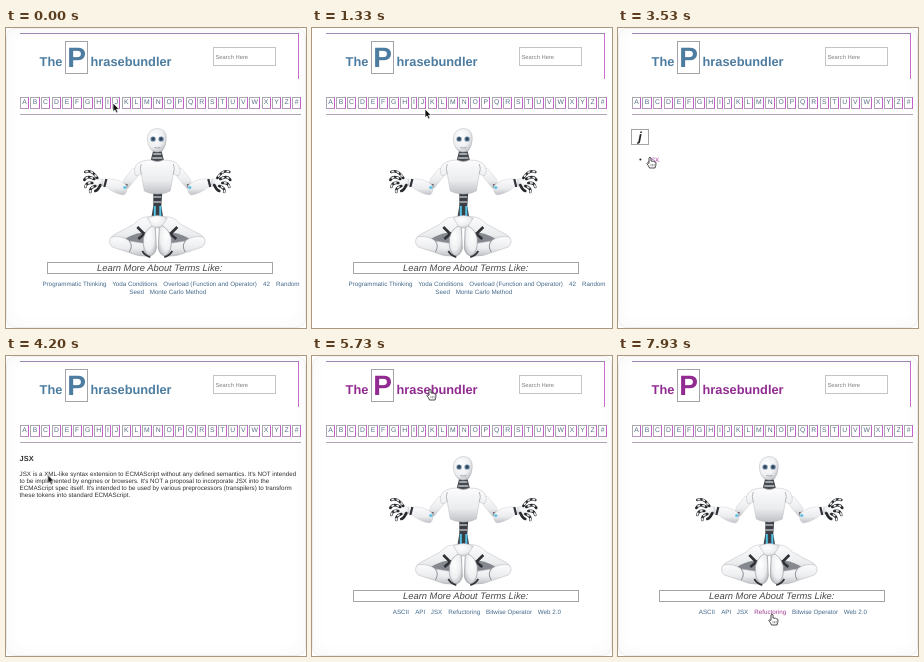
Recreate the animation shown at these times as an HTML page. Size 300 by 300 pixels, loop 8000 ms.

```html
<!DOCTYPE html>
<html lang="en">
<head>
<meta charset="utf-8">
<title>The Phrasebundler</title>
<style>
html, body { margin: 0; width: 100%; height: 100%; overflow: hidden; background: #fff; }
body { position: relative; font-family: "Liberation Sans", Arial, sans-serif; text-rendering: geometricPrecision; }
svg { position: absolute; left: 0; top: 0; width: 300px; height: 300px; }
.frame {
  position: absolute; left: 0; top: 0; width: 300px; height: 300px; box-sizing: border-box;
  border: 1px solid #ededed; border-radius: 9px; box-shadow: inset 0 0 16px rgba(0,0,0,.035);
  animation: frame 8s linear infinite;
}
nav { position: absolute; left: 14px; top: 69px; width: 281px; height: 12px; display: flex; justify-content: space-between; }
nav b {
  box-sizing: border-box; height: 12px; padding: 0 1.3px; border: 1px solid #aaa6b0;
  border-right-color: #c45fca; border-bottom-color: #b893be;
  font: 6.8px/10px "Liberation Sans", Arial, sans-serif; color: #566f84;
}
nav .hot { animation: hotCell 8s step-end infinite; }
text { font-size: 6.24px; fill: #446a8b; white-space: pre; }
.logo text { font-size: 12.8px; font-weight: bold; fill: inherit; }
.logo .cap { font-size: 28px; text-anchor: middle; }
.logo { fill: #4c7ca0; animation: logo 8s step-end infinite; }
.ink text { fill: #303030; }
.box { fill: none; stroke: #a5a3aa; }
.show { visibility: hidden; animation: 8s step-end infinite; }
.robot { animation-name: robot; }
.home1 { animation-name: home1; }
.letter { animation-name: letter; }
.term { animation-name: term; }
.home2 { animation-name: home2; }
.arrow { animation-name: arrow; }
.hand { animation-name: hand; }
text.jsx { animation: jsx 8s step-end infinite; }
text.pick { animation: pick 8s step-end infinite; }
.cursor { animation: move 8s ease-in-out infinite; }

@keyframes frame { 0% { opacity: 1 } 10% { opacity: 0 } 17.5% { opacity: 0 } 21.6%, 100% { opacity: 1 } }
@keyframes robot { 0% { visibility: visible } 30.9% { visibility: hidden } 68.75%, 100% { visibility: visible } }
@keyframes home1 { 0% { visibility: visible } 30.9%, 100% { visibility: hidden } }
@keyframes letter { 0% { visibility: hidden } 30.9% { visibility: visible } 48.4%, 100% { visibility: hidden } }
@keyframes term { 0% { visibility: hidden } 48.4% { visibility: visible } 68.75%, 100% { visibility: hidden } }
@keyframes home2 { 0% { visibility: hidden } 68.75%, 100% { visibility: visible } }
@keyframes arrow {
  0% { visibility: visible } 23% { visibility: hidden } 33.3% { visibility: visible }
  40% { visibility: hidden } 49% { visibility: visible } 65% { visibility: hidden }
  80.5% { visibility: visible } 95%, 100% { visibility: hidden }
}
@keyframes hand {
  0% { visibility: hidden } 23% { visibility: visible } 33.3% { visibility: hidden }
  40% { visibility: visible } 49% { visibility: hidden } 65% { visibility: visible }
  80.5% { visibility: hidden } 95%, 100% { visibility: visible }
}
@keyframes logo { 0% { fill: #4c7ca0 } 65%, 100% { fill: #922b91 } }
@keyframes hotCell { 0% { color: #566f84 } 23% { color: #a03aa0 } 33.3%, 100% { color: #566f84 } }
@keyframes jsx { 0% { fill: #446a8b } 40%, 100% { fill: #a03aa0 } }
@keyframes pick { 0% { fill: #446a8b } 95%, 100% { fill: #a03a90 } }
@keyframes move {
  0% { transform: translate(107px, 75px) }
  12%, 17% { transform: translate(113px, 81px) }
  24%, 32.6% { transform: translate(110px, 77px) }
  34.2%, 36% { transform: translate(37px, 123px) }
  40.5%, 50% { transform: translate(32px, 129px) }
  60.5%, 62.5% { transform: translate(114px, 42px) }
  66%, 79% { transform: translate(118px, 33px) }
  92.5%, 95% { transform: translate(153px, 249px) }
  98.5%, 100% { transform: translate(154px, 258px) }
}
</style>
</head>
<body>
<svg viewBox="0 0 300 300">
  <defs>
    <linearGradient id="shell" x1="0" y1="0" x2="0" y2="1">
      <stop offset="0" stop-color="#fcfcfd"/><stop offset=".6" stop-color="#ebecee"/><stop offset="1" stop-color="#bfc1c5"/>
    </linearGradient>
    <radialGradient id="ball" cx=".4" cy=".35" r=".75">
      <stop offset="0" stop-color="#fff"/><stop offset=".6" stop-color="#eeeff1"/><stop offset="1" stop-color="#b2b4b9"/>
    </radialGradient>
    <g id="side">
      <!-- arm -->
      <path d="M-24 140Q-16 143 -20 149L-29 160Q-33 163 -35 159L-33 151Z" fill="url(#shell)" stroke="#c2c4c8" stroke-width=".4"/>
      <path d="M-31 156L-33 164" stroke="#55585f" stroke-width="3"/>
      <path d="M-31 157Q-40 150 -50 151L-52 158Q-43 166 -34 167Q-29 165 -31 157Z" fill="url(#shell)" stroke="#c2c4c8" stroke-width=".4"/>
      <circle cx="-32.5" cy="159.5" r="1.6" fill="#5fc3e2"/>
      <path d="M-51 151L-53 159" stroke="#303237" stroke-width="2.2"/>
      <path d="M-54 151Q-62 148 -67 151Q-67 156 -61 159Q-56 160 -54 157Z" fill="url(#ball)"/>
      <g fill="none" stroke-linecap="round">
        <path d="M-60 150Q-66 141 -72 144M-63 151Q-70 147 -73 152M-65 155Q-71 154 -72 159M-62 158Q-68 160 -67 164M-57 157Q-59 162 -62 163" stroke="#26282c" stroke-width="2.6"/>
        <path d="M-60 150Q-66 141 -72 144M-63 151Q-70 147 -73 152M-65 155Q-71 154 -72 159M-62 158Q-68 160 -67 164" stroke="#eceef0" stroke-width="1.6" stroke-dasharray="1.6 3.6" stroke-dashoffset="-2"/>
      </g>
      <!-- leg -->
      <path d="M-4 189Q-16 187 -23 196L-44 207Q-50 212 -44 217L-16 219L-2 207Z" fill="url(#shell)" stroke="#bbbdc2" stroke-width=".5"/>
      <path d="M-12 204Q-26 206 -34 212L-16 216L-4 210Z" fill="#85888e"/>
      <path d="M-46 209Q-36 207 -28 213L-9 216Q-2 222 -9 228Q-20 229 -30 224L-45 219Q-50 214 -46 209Z" fill="url(#shell)" stroke="#b2b4b9" stroke-width=".5"/>
      <path d="M-20 199L-13 206L-19 211" fill="none" stroke="#2f3136" stroke-width="2.6"/>
      <path d="M-28 213Q-24 218 -28 224" fill="none" stroke="#8b8e94" stroke-width="1"/>
      <path d="M-2 197Q-11 199 -14 210Q-15 224 -8 228Q-2 227 -1 220Z" fill="url(#ball)" stroke="#8d9096" stroke-width=".6"/>
      <path d="M-15 223Q-12 228 -7 229" fill="none" stroke="#303237" stroke-width="1.8"/>
    </g>
  </defs>

  <path d="M14 5.5H293" stroke="#9d88b4"/>
  <path d="M292.5 6V51" stroke="#c86fca"/>
  <path d="M14 86.5H295" stroke="#b3a3b8"/>
  <rect class="box" x="59.5" y="13.5" width="22" height="32"/>
  <g class="logo">
    <text x="33.6" y="38">The</text>
    <text class="cap" x="70.5" y="39">P</text>
    <text x="84.5" y="38">hrasebundler</text>
  </g>
  <rect class="box" x="207.5" y="19.5" width="62" height="18" stroke-opacity=".65"/>
  <text x="209.5" y="30.6" style="font-size:5.8px;fill:#808080">Search Here</text>

  <g class="show robot">
    <g transform="translate(151.3 0)">
      <path d="M-4 164H5L4 178L6 190H-6L-4 178Z" fill="#3b3e44"/>
      <path d="M-4 169H4M-4 174H4" stroke="#b5b9be" stroke-width="1.4"/>
      <path d="M-2.5 178V188M3 178V188" stroke="#52c3e4" stroke-width="2"/>
      <use href="#side"/>
      <use href="#side" transform="scale(-1 1)"/>
      <path d="M-10 190Q0 185 10 190L5 198Q0 202 -5 198Z" fill="url(#ball)" stroke="#b4b6bb" stroke-width=".5"/>
      <path d="M-4 122H4L7 134Q0 137 -7 134Z" fill="#45484e"/>
      <path d="M-4 126H4M-5 130H5" stroke="#c0c5ca" stroke-width="1.4"/>
      <path d="M-6 132Q0 135 6 132Q17 132 21 137Q25 143 21 148L16 146L13 163Q8 166 0 166Q-8 166 -13 163L-16 146L-21 148Q-25 143 -21 137Q-17 132 -6 132Z" fill="url(#shell)" stroke="#b9bbc0" stroke-width=".5"/>
      <path d="M-16 146Q-18 140 -16 136M16 146Q18 140 16 136" fill="none" stroke="#a5a8ad" stroke-width=".8"/>
      <path d="M0 100.5Q9 101 9 110Q9 118 5 123Q0 125 -5 123Q-10 118 -10 110Q-9 101 0 100.5Z" fill="url(#ball)" stroke="#b5b8bd" stroke-width=".5"/>
      <g fill="#5d7893">
        <circle cx="-4.2" cy="111" r="2.6"/><circle cx="3.8" cy="111" r="2.6"/>
      </g>
      <g fill="#2d435d">
        <circle cx="-4.2" cy="111" r="1.4"/><circle cx="3.8" cy="111" r="1.4"/>
      </g>
      <path d="M-3 119.5Q0 120.5 3 119.5" fill="none" stroke="#999da3" stroke-width=".9"/>
    </g>
    <rect class="box" x="41.5" y="234.5" width="225" height="11"/>
    <text x="91" y="243" style="font-size:9.4px;font-style:italic;fill:#484848">Learn More About Terms Like:</text>
  </g>

  <g class="show home1">
    <text x="36.5" y="258.3">Programmatic Thinking</text>
    <text x="106.2" y="258.3">Yoda Conditions</text>
    <text x="157.3" y="258.3">Overload (Function and Operator)</text>
    <text x="257" y="258.3">42</text>
    <text x="270" y="258.3">Random</text>
    <text x="123.3" y="265.6">Seed</text>
    <text x="143.7" y="265.6">Monte Carlo Method</text>
  </g>

  <g class="show letter">
    <rect class="box" x="13.5" y="101.5" width="17" height="15"/>
    <text x="22" y="112.5" text-anchor="middle" style="font-size:13px;font-weight:bold;font-style:italic;fill:#222">j</text>
    <circle cx="22.4" cy="131.6" r="1" fill="#222"/>
    <text class="jsx" x="29.8" y="133.8">JSX</text>
  </g>

  <g class="show term ink">
    <text x="13.6" y="104.7" style="font-size:7.4px;font-weight:bold">JSX</text>
    <text x="13.6" y="119.6">JSX is a XML-like syntax extension to ECMAScript without any defined semantics. It's NOT intended</text>
    <text x="13.6" y="126.6">to be implemented by engines or browsers. It's NOT a proposal to incorporate JSX into the</text>
    <text x="13.6" y="133.6">ECMAScript spec itself. It's intended to be used by various preprocessors (transpilers) to transform</text>
    <text x="13.6" y="140.6">these tokens into standard ECMAScript.</text>
  </g>

  <g class="show home2">
    <text x="80.8" y="258.3">ASCII</text>
    <text x="103.2" y="258.3">API</text>
    <text x="118.8" y="258.3">JSX</text>
    <text class="pick" x="136.3" y="258.3">Refuctoring</text>
    <text x="174" y="258.3">Bitwise Operator</text>
    <text x="225.8" y="258.3">Web 2.0</text>
  </g>
</svg>
<nav></nav>
<div class="frame"></div>
<svg viewBox="0 0 300 300">
  <g class="cursor" stroke-linejoin="round">
    <path class="show arrow" d="M0 0V8.6L2 6.9L3.4 10L5 9.3L3.6 6.3H6.2Z" fill="#111" stroke="#fff" stroke-width=".7"/>
    <g class="show hand">
      <path d="M-1 1Q0 -.6 1 1V4.2Q2 3.3 2.8 4.4Q4 3.7 4.6 4.9Q6 4.6 6 6Q6 8.5 5 11H-.5Q-1.2 8.8 -3.2 6.7Q-3.2 5 -1 6.4Z" fill="#fff" stroke="#222" stroke-width=".8"/>
      <path d="M1 7V9.3M2.6 7V9.3M4.2 7V9.3" stroke="#444" stroke-width=".5"/>
    </g>
  </g>
</svg>
<script>
const nav = document.querySelector("nav");
for (const c of "ABCDEFGHIJKLMNOPQRSTUVWXYZ#") {
  const cell = document.createElement("b");
  cell.textContent = c;
  if (c === "J") cell.className = "hot";
  nav.append(cell);
}
</script>
</body>
</html>
```
